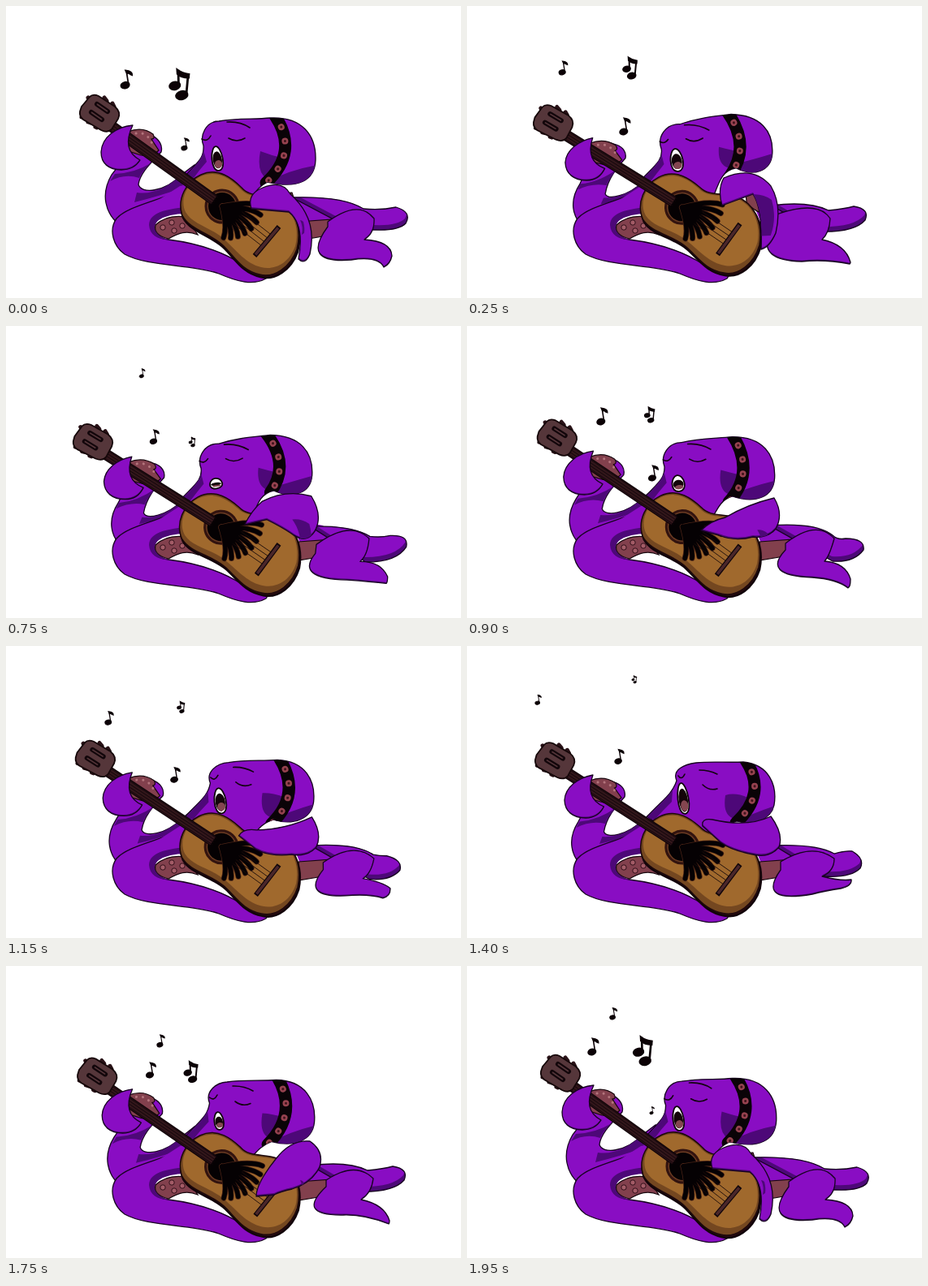
An HTML page that plays this animation: 560 px wide and 360 px high, repeating every 2 s.

```html
<!DOCTYPE html>
<html lang="en">
<head>
<meta charset="utf-8">
<title>Singing octopus with guitar</title>
<style>
html, body { margin: 0; width: 100%; height: 100%; overflow: hidden; background: #fff; }
svg { display: block; width: 560px; height: 360px; }
.skin { fill: #890dc3; }
.dark { fill: #4d0878; }
.edge { fill: none; stroke: #16031f; stroke-width: 1.3; stroke-linejoin: round; }
.pink { fill: #82404d; stroke: #16060c; stroke-width: 1.2; }
.line { fill: none; stroke: #12030f; stroke-width: 1.6; stroke-linecap: round; }
</style>
</head>
<body>
<svg id="stage" viewBox="0 0 560 360"></svg>
<script>
const LOOP = 2000, STEP = 50;
const KEYS = [0, 250, 550, 900, 1400, 1750, 1950];

// Limbs: one path per distinct pose, arranged along KEYS.
const rest = {
  arm: 'M302 250Q296 232 316 224Q340 214 350 232Q384 262 374 306Q368 320 360 312Q368 270 348 254Z',
  tail: 'M352 236Q415 234 440 250Q462 252 480 248Q500 254 492 268Q478 282 420 272Z',
  leg: 'M396 266Q434 238 453 262Q454 280 441 288Q474 290 475 308Q473 318 465 322Q458 308 425 313Q362 318 396 272Z'
};
const low = {
  tail: 'M375 246Q420 240 445 252Q465 250 476 247Q496 250 490 264Q476 280 430 278Z'
};
const arms = [
  rest.arm,
  'M314 246Q308 226 316 212Q352 196 374 222Q388 246 380 280Q372 298 362 300Q364 250 352 232Z',
  'M304 232Q306 205 310 186Q345 176 372 208Q390 236 382 258Q372 282 358 260Q362 226 340 210Z',
  'M288 252Q300 240 318 236Q345 220 378 212Q390 232 380 250Q370 262 352 260Q330 266 310 258Z',
  'M290 222Q288 212 302 214Q345 224 374 210Q390 232 384 248Q372 262 352 257Q325 252 312 242Z',
  'M308 284Q308 268 332 238Q350 214 374 216Q392 228 386 248Q376 268 352 275Q338 278 330 282Z',
  rest.arm
];
const tails = [
  rest.tail, low.tail,
  'M378 248Q420 250 445 260Q470 254 483 251Q504 250 498 266Q486 288 430 290Z',
  'M372 246Q430 242 450 258Q456 264 466 262Q490 262 488 276Q476 292 450 290Z',
  'M378 246Q430 244 452 256Q466 252 474 253Q490 262 484 274Q472 286 440 284Z',
  low.tail, rest.tail
];
const legs = [
  rest.leg,
  'M368 262Q430 236 447 262Q446 280 437 288Q466 294 472 316Q472 317 471 318Q440 312 412 315Q358 314 372 280Z',
  'M366 270Q415 240 440 262Q445 280 430 290Q455 288 467 303Q467 306 466 307Q440 318 412 317Q345 318 364 286Z',
  'M392 268Q430 238 452 262Q446 284 440 290Q466 292 472 312Q472 322 469 323Q455 312 425 310Q362 308 392 276Z',
  'M386 266Q425 242 452 262Q452 278 437 284Q460 290 473 288Q474 296 460 299Q440 302 425 306Q356 318 386 276Z',
  'M394 264Q430 240 452 262Q450 280 437 288Q466 294 472 314Q472 317 471 318Q440 306 415 307Q356 308 394 272Z',
  rest.leg
];
const bands = [
  'M331 135Q361 180 320 218', 'M320 130Q350 172 324 209', 'M313 130Q345 158 331 190',
  'M326 133Q356 180 322 217', 'M343 141Q370 182 331 218', 'M334 137Q360 182 322 220',
  'M330 135Q360 180 321 218'
];
const mouth = {
  x: [260, 258, 257, 260, 266, 262, 260],
  y: [188, 190, 193, 194, 188, 191, 188],
  rx: [7, 8, 8, 8, 7, 6, 7],
  ry: [15, 14, 3.5, 10, 19, 11, 15]
};
const dip = [0, .65, 1, .3, .5, .2, 0];
const forward = [0, .75, 1, .3, 0, 0, 0];
const back = [0, 0, 0, .1, 1, .5, .1];

// Head: upright, forward, thrown back.
const heads = [
  'M222 208C236 192 244 188 243 172C238 160 246 142 262 142C285 138 305 140 325 138C365 136 382 160 381 190C380 215 360 226 322 217C312 222 308 228 302 236L260 240Z',
  'M214 214C232 196 240 190 238 178C232 162 244 146 262 147C285 138 300 135 325 132C360 134 376 152 374 180C372 200 350 206 334 194C316 196 312 210 304 234L260 240Z',
  'M222 210C240 190 252 184 258 166C252 152 268 146 282 144C300 142 320 144 340 143C372 146 382 172 378 196C374 214 352 222 332 216C318 220 312 226 302 236L260 240Z'
];
const faces = [
  'M274 163Q284 169 294 163M272 143Q288 142 300 150M241 164Q248 168 252 160',
  'M268 164Q278 170 289 163M266 148Q282 146 297 154M236 168Q241 172 246 166',
  'M290 171Q298 179 308 176M286 153Q298 153 308 158M260 160Q264 166 268 158'
];
// Beside the band, under the dome, along the cheek.
const shadows = [
  'M313 179Q326 184 339 187Q333 204 321 213Q308 205 313 179ZM322 217Q348 202 384 196L372 230L322 230ZM220 210Q238 196 243 178L247 192Q238 202 231 212Z',
  'M309 172Q318 174 328 176Q329 184 322 195Q308 192 309 172ZM330 188Q352 186 378 176L370 208L330 206ZM212 216Q232 200 238 184L241 196Q232 208 224 218Z',
  'M318 184Q330 180 346 187Q342 204 330 213Q314 210 318 184ZM330 217Q352 206 382 196L372 226L330 226ZM220 212Q242 192 253 178L252 192Q240 204 231 214Z'
];

// Parts that follow the neck: neck up, neck down.
const coils = [
  'M150 160C175 150 195 165 191 180C180 192 165 205 163 220C166 232 195 230 216 208L232 196L228 240L140 270C122 256 116 232 130 208L140 195Z',
  'M152 180C180 170 200 178 197 192C190 200 178 215 174 238C178 244 200 236 216 222L232 206L228 240L145 275C134 262 130 245 144 225L146 215Z'
];
const undersides = [
  'M134 207Q158 206 178 194Q167 204 164 212Q146 206 128 216ZM161 230Q188 234 216 208L218 224Q190 234 158 242Z',
  'M143 226Q164 224 190 204Q178 218 176 226Q158 224 141 232ZM172 240Q196 240 216 222L218 230Q196 240 168 246Z'
];
const grips = [
  'M150 155Q168 148 181 158Q184 164 179 164L188 178Q180 186 166 184L148 178Z',
  'M152 177Q168 170 184 179Q188 184 184 186L192 196Q184 204 170 202L152 198Z'
];
const tips = [
  'M156 147C135 149 118 162 117 180C117 194 126 202 142 202C152 202 160 198 165 190C150 182 146 168 156 147Z',
  'M154 171C138 176 124 186 123 200C124 214 134 222 150 222C160 222 168 216 172 206C154 200 150 188 154 171Z'
];

// Inside of the strumming arm: hidden, arched.
const armpits = [
  'M350 230L352 230L354 236Q352 236 351 234Z',
  'M338 208L358 212L366 262Q354 258 342 246Z'
];
const armShades = [
  'M362 264Q364 264 366 266Q368 274 367 280L364 282Q366 272 362 264Z',
  'M346 222Q364 220 378 230Q386 258 376 284L362 284Q364 244 346 222Z'
];

// Note tracks: [time, x, y, height].
const singles = [
  [[1500, 215, 165, 10], [1750, 179, 128, 20], [1950, 156, 99, 22], [2000, 149, 90, 24], [2250, 119, 76, 18], [2400, 100, 66, 12]],
  [[1950, 228, 178, 10], [2000, 221, 170, 16], [2250, 195, 148, 22], [2550, 176, 106, 24], [2800, 166, 46, 9]],
  [[450, 222, 180, 8], [550, 205, 170, 14], [900, 167, 111, 22], [1400, 88, 66, 13], [1450, 84, 62, 11]],
  [[800, 240, 188, 10], [900, 230, 181, 20], [1400, 188, 136, 19], [1750, 191, 92, 16], [2000, 178, 50, 15]]
];
const doubles = [
  [[1550, 235, 170, 10], [1750, 228, 130, 27], [1950, 217, 104, 37], [2000, 214, 96, 39], [2250, 201, 76, 28], [2550, 184, 49, 13], [2600, 183, 46, 10]],
  [[650, 232, 165, 8], [900, 225, 109, 20], [1400, 206, 41, 10], [1450, 205, 39, 8]]
];

const shaded = (id, dx, dy) => `
  <defs><path id="${id}"/><clipPath id="${id}Clip"><use href="#${id}"/></clipPath></defs>
  <use href="#${id}" class="dark"/>
  <g clip-path="url(#${id}Clip)"><use href="#${id}" class="skin" transform="translate(${dx} ${dy})"/></g>
  <use href="#${id}" class="edge"/>`;

const rings = points => points.map(([x, y]) =>
  `<circle cx="${x}" cy="${y}" r="3.2" fill="#a35c67" stroke="#32101a"/>`).join('');

const strings = (x1, y1, x2, y2, gap, count, color) => Array.from({ length: count }, (_, i) => {
  const o = (i - (count - 1) / 2) * gap;
  return `<path d="M${x1 + o * .6} ${y1 - o * .8}L${x2 + o * .6} ${y2 - o * .8}" stroke="${color}" stroke-width=".9"/>`;
}).join('');

const fringe = Array.from({ length: 8 }, (_, i) => {
  const a = (i * 12.5) * Math.PI / 180, r = 50 - 1.6 * i;
  const at = (k, turn) => `${266 + k * Math.cos(a + turn)} ${247 + k * Math.sin(a + turn)}`;
  return `M266 247Q${at(r * .7, -.2)} ${at(r, 0)}`;
}).join('');

const bodyPath = 'M240 208C262 198 280 214 290 224C300 236 318 232 334 238C358 250 364 276 358 300C350 322 330 336 312 331C290 326 282 310 268 296C252 280 226 276 217 258C210 238 222 216 240 208Z';
const guitar = `
  <g id="guitar">
    <path d="${bodyPath}" transform="translate(1 3)" fill="#2b0b10" stroke="#12040a" stroke-width="2.5"/>
    <path d="${bodyPath}" fill="#744720" stroke="#1c080a" stroke-width="1.5"/>
    <path d="M240 210C262 201 278 215 289 226C300 238 318 234 333 240C356 251 361 276 356 296C348 318 330 326 314 322C296 318 284 302 270 289C254 273 230 270 221 254C213 238 224 217 240 210Z" fill="#a0692d"/>
    <circle cx="266" cy="247" r="20" fill="#6b3b22" stroke="#32130f" stroke-width="3"/>
    <circle cx="266" cy="247" r="17" fill="#050103"/>
    <path d="${fringe}" fill="none" stroke="#4a2316" stroke-width="7" stroke-linecap="round"/>
    <path d="${fringe}" fill="none" stroke="#050103" stroke-width="5.5" stroke-linecap="round"/>
    ${strings(285, 261, 322, 290, 6, 4, '#1b0b0a')}
    <path d="M306 308L336 272" stroke="#10050a" stroke-width="6"/>
    <path d="M307 306.500L335 273.500" stroke="#4b272a" stroke-width="3.5"/>
    <path d="M128 147L256 239" stroke="#0f0408" stroke-width="14"/>
    <path d="M128 147L256 239" stroke="#32161a" stroke-width="11.5"/>
    ${strings(128, 147, 258, 240, 3.2, 4, '#10050a')}
    <path d="M101 113l2 3M121 113l3 4M131 120l2 4M93 137l3 1M101 143l3 1M110 149l2 1" stroke="#2a1318" stroke-width="5" stroke-linecap="round"/>
    <path d="M93 124L103 112Q107 108 114 111L134 124Q142 131 138 139L130 152Q125 157 117 153L95 140Q90 136 91 130Z" fill="#55363a" stroke="#150709" stroke-width="1.8"/>
    <path d="M112 121L125 130M105 131L118 140" stroke="#12060a" stroke-width="6" stroke-linecap="round"/>
    <path d="M112 121L125 130M105 131L118 140" stroke="#55363a" stroke-width="1.6"/>
  </g>`;

const single = '<ellipse cx="-2.5" cy="8" rx="5.5" ry="4" transform="rotate(-15 -2.5 8)"/><path d="M-1 -11L2 8"/><path d="M-2 -11Q7 -10 6.500 -5L4 -6Q2 -8 0 -7Z"/>';
const double = '<ellipse cx="-4" cy="1.5" rx="4" ry="2.800" transform="rotate(-15 -4 1.5)"/><ellipse cx="1.5" cy="9" rx="4.4" ry="3" transform="rotate(-15 1.5 9)"/><path d="M-1.3 -11L-1 1M6.4 -6L5 9" fill="none"/><path d="M-2 -11Q2 -8 7 -7.5L6.800 -5Q1 -5 -1.800 -8Z"/>';

document.getElementById('stage').innerHTML = `
  <path class="skin" d="M350 238L390 246L404 264L362 268Z"/>
  ${shaded('tail', -1, -6)}
  <path class="pink" d="M360 266L402 263L390 284L360 289Z"/>
  ${shaded('leg', 0, -1.500)}
  <path class="skin" d="M225 206L300 225L300 260L215 250Z"/>
  <path id="coil" class="skin" stroke="#16031f" stroke-width="1.3"/>
  <path id="underside" class="dark"/>
  <path id="grip" class="pink"/>
  <path id="gripRings" fill="none" stroke="#b3747c" stroke-width="3" stroke-dasharray="0.1 8" stroke-linecap="round"/>
  <path id="armpit" class="pink"/>
  ${shaded('head', 0, 0)}
  <g clip-path="url(#headClip)" fill="none" stroke-linecap="round">
    <path id="shadow" class="dark"/>
    <path id="band" stroke="#0a0307" stroke-width="15"/>
    <path id="studs" stroke="#96424f" stroke-width="8" stroke-dasharray="0.1 18" stroke-dashoffset="-16"/>
    <path id="studHoles" stroke="#3f131c" stroke-width="3" stroke-dasharray="0.1 18" stroke-dashoffset="-16"/>
  </g>
  <path id="face" class="line"/>
  <g id="mouth">
    <path id="lips" fill="#fff" stroke="#0d0309" stroke-width="1.8"/>
    <ellipse id="throat" fill="#14040a"/>
    <ellipse id="tongue" fill="#844650"/>
  </g>
  <path class="skin" stroke="#16031f" stroke-width="1.3" d="M222 224C190 240 150 246 136 262C126 276 132 296 146 306C175 322 230 318 262 330C285 340 304 345 320 336L330 320L290 318C262 300 232 292 200 288C180 286 174 274 182 264C190 256 208 252 222 248Z"/>
  <path class="skin" d="M214 222L250 215L240 250L190 252L180 244Z"/>
  <path class="dark" d="M222 248C200 250 176 254 176 270C177 282 186 288 200 288C182 282 180 270 188 264Q200 256 222 256Z"/>
  <path class="pink" d="M184 270C194 260 208 258 222 260L236 282C222 276 212 280 200 287C188 284 182 278 184 270Z"/>
  ${rings([[193, 273], [204, 267], [207, 277], [217, 271]])}
  ${guitar}
  ${shaded('tip', 0, -1.500)}
  ${shaded('arm', 0, -2)}
  <path id="armShade" class="dark" clip-path="url(#armClip)"/>
  <g id="notes" fill="#0c0206" stroke="#0c0206" stroke-width="1.800">${singles.map(() => `<g>${single}</g>`).join('')}${doubles.map(() => `<g>${double}</g>`).join('')}</g>`;

const el = id => document.getElementById(id);
const noteEls = [...el('notes').children];
const sum = (values, w) => values.reduce((s, v, i) => s + v * w[i], 0);

// Weighted mix of paths that share the same commands.
function mix(paths, w) {
  const numbers = paths.map(p => p.match(/-?[\d.]+/g).map(Number));
  let i = 0;
  return paths[0].replace(/-?[\d.]+/g, () => {
    const v = sum(numbers.map(n => n[i]), w);
    i++;
    return v.toFixed(2);
  });
}

// Smooth cyclic interpolation, expressed as one weight per key.
function keyWeights(t) {
  const n = KEYS.length, w = Array(n).fill(0);
  const time = k => KEYS[(k + n) % n] + LOOP * Math.floor(k / n);
  const add = (k, v) => { w[(k + n) % n] += v; };
  const i = KEYS.findLastIndex(k => k <= t);
  const h = time(i + 1) - time(i), s = (t - time(i)) / h, r = 1 - s;
  const slope = (k, v) => {
    const m = v * h / (time(k + 1) - time(k - 1));
    add(k + 1, m);
    add(k - 1, -m);
  };
  add(i, (1 + 2 * s) * r * r);
  add(i + 1, s * s * (3 - 2 * s));
  slope(i, s * r * r);
  slope(i + 1, -s * s * r);
  return w;
}

function placeNote(node, track, t) {
  const now = t < track[0][0] ? t + LOOP : t;
  const i = track.findIndex(k => k[0] > now) - 1;
  node.style.display = i < 0 ? 'none' : '';
  if (i < 0) return;
  const [a, b] = [track[i], track[i + 1]], s = (now - a[0]) / (b[0] - a[0]);
  const [, x, y, h] = a.map((v, k) => v + (b[k] - v) * s);
  node.setAttribute('transform', `translate(${x} ${y}) scale(${h / 25})`);
}

function ellipse(id, cx, cy, rx, ry) {
  Object.entries({ cx, cy, rx, ry }).forEach(([k, v]) => el(id).setAttribute(k, Math.max(0, v)));
}

function drawMouth(x, y, rx, ry) {
  const top = y - ry, bottom = y + ry;
  el('lips').setAttribute('d', `M${x} ${top}C${x + rx} ${top} ${x + rx * 1.5} ${bottom} ${x} ${bottom}S${x - rx} ${top} ${x} ${top}Z`);
  ellipse('throat', x, y + ry * .12, rx * .8, ry - 4.5);
  ellipse('tongue', x + .5, y + ry * .48, rx * .65, (ry - 4) * .45);
  el('mouth').setAttribute('transform', `rotate(-8 ${x} ${y})`);
}

function draw(t) {
  const w = keyWeights(t), path = (id, paths, weights) => el(id).setAttribute('d', mix(paths, weights));
  const g = sum(dip, w), a = sum(forward, w), b = sum(back, w);
  const neck = [1 - g, g], lean = [1 - a - b, a, b], arch = [1 - a, a];

  path('arm', arms, w);
  path('tail', tails, w);
  path('leg', legs, w);
  ['band', 'studs', 'studHoles'].forEach(id => path(id, bands, w));
  path('head', heads, lean);
  path('face', faces, lean);
  path('shadow', shadows, lean);
  path('coil', coils, neck);
  path('underside', undersides, neck);
  path('grip', grips, neck);
  path('gripRings', ['M160 157Q176 154 182 176', 'M162 179Q178 176 188 194'], neck);
  path('tip', tips, neck);
  path('armpit', armpits, arch);
  path('armShade', armShades, arch);
  el('guitar').setAttribute('transform', `rotate(${-6 * g} 285 270)`);
  drawMouth(...['x', 'y', 'rx', 'ry'].map(k => sum(mouth[k], w)));
  [...singles, ...doubles].forEach((track, i) => placeNote(noteEls[i], track, t));
}

const start = performance.now();
function tick() {
  const t = (performance.now() - start) % LOOP;
  draw(Math.floor(t / STEP) * STEP);
  requestAnimationFrame(tick);
}
tick();
</script>
</body>
</html>
```
